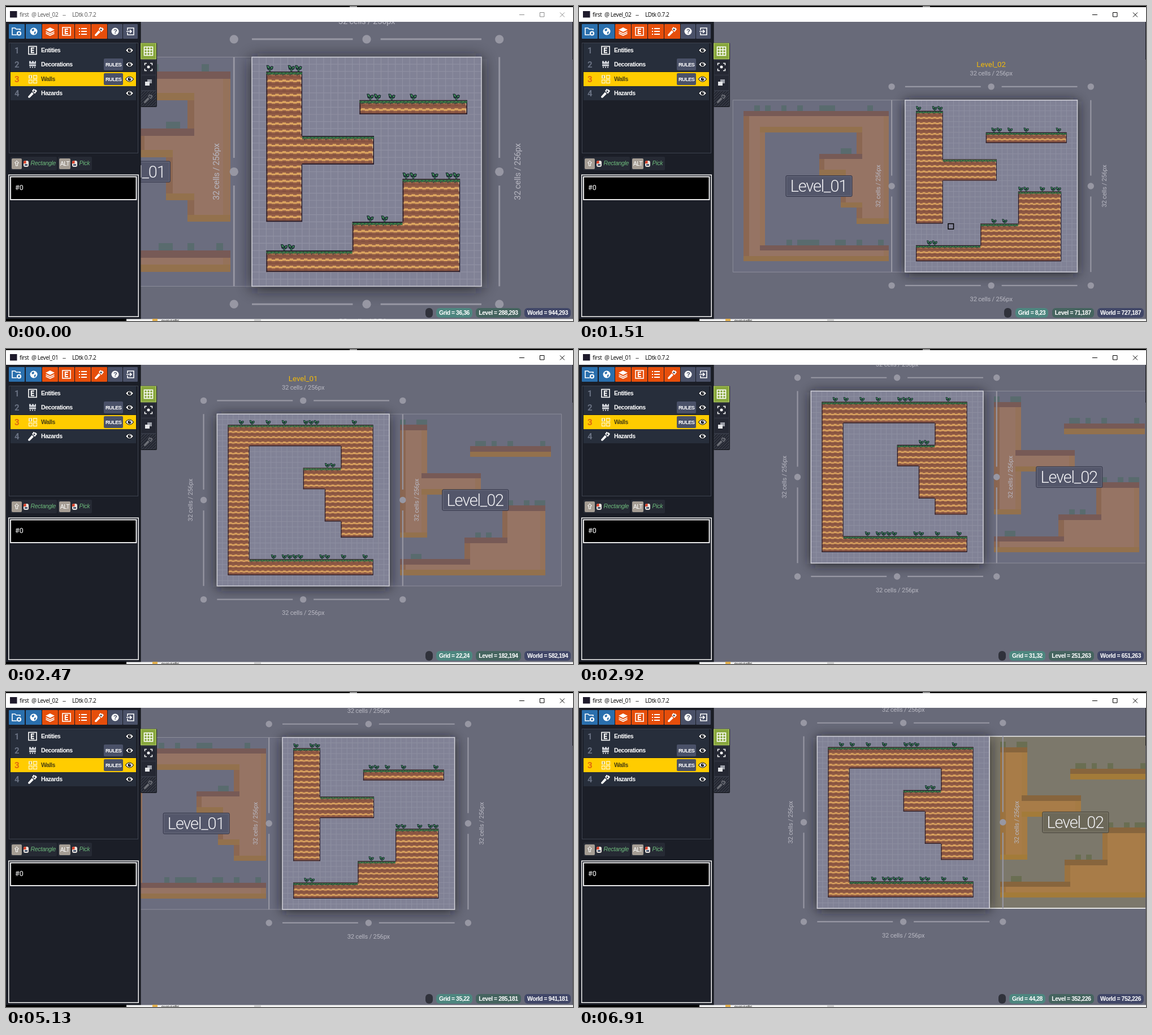
These frames come from a looping animation (1003 px wide and 558 px high, 8 s). An HTML page:

```html
<!DOCTYPE html>
<html lang="en">
<head>
<meta charset="utf-8">
<title>Level editor</title>
<style>
  html, body { margin: 0; width: 1003px; height: 558px; overflow: hidden; background: #686a79; }
  body { position: relative; }
  svg { position: absolute; left: 0; top: 0; display: block; }
  .ui { font: bold 10.6px "Liberation Sans", Arial, sans-serif; letter-spacing: -.5px; fill: #fff; }
  .title { font: 10px "Open Sans", sans-serif; letter-spacing: -.4px; }
  .num { font: bold 15px Roboto, sans-serif; fill: #697182; letter-spacing: 0; }
  .hint { font: italic 10.5px "Liberation Sans", Arial, sans-serif; letter-spacing: -.3px; fill: #6dba7c; }
  .size { font: 9.4px Roboto, sans-serif; letter-spacing: -.2px; fill: #b7b7c1; text-anchor: middle; }
  .name { font: 11.2px Roboto, sans-serif; fill: #f0b90c; text-anchor: middle; }
  .label { font: 300 29px Roboto, sans-serif; letter-spacing: -1.2px; fill: #f1f1f4; text-anchor: middle; }
  .tag { fill: #53566a; stroke: #34364a; }
  .bg { fill: #6b6d7f; stroke: #8c8d9a; stroke-width: 1; vector-effect: non-scaling-stroke; }
  .mid { fill: #967464; } .top { fill: #775a56; } .left { fill: #8b6752; }
  .right { fill: #95725a; } .bot { fill: #93714d; } .deco { fill: #596b6e; }
  .hot .bg { fill: #7c786b; stroke: #f2f2f2; stroke-width: 1.6; }
  .hot .mid { fill: #a87c48; } .hot .top { fill: #87653d; } .hot .left { fill: #9c7340; }
  .hot .right { fill: #a57b44; } .hot .bot { fill: #a37b39; } .hot .deco { fill: #6a6e52; }
  .hot .tag { fill: #6c6859; stroke: #47443a; }
  .dim path { shape-rendering: crispEdges; }
  #hud { position: absolute; right: 4px; top: 534.5px; height: 17px; display: flex; gap: 6.5px; align-items: stretch;
         font: bold 10.4px/17px "Liberation Sans", Arial, sans-serif; letter-spacing: -.45px; color: #fff; white-space: pre; }
  #hud span { padding: 0 5px; border-radius: 6px; min-width: 3px; }
</style>
</head>
<body>
<svg id="stage" width="1003" height="558" viewBox="0 0 1003 558"></svg>
<div id="hud">
  <span id="value"></span>
  <span id="grid" style="background:#4d867f"></span>
  <span id="local" style="background:#45645f"></span>
  <span id="world" style="background:#414768"></span>
</div>
<script>
const LOOP = 8000, S = 1.19, SIZE = 256;
const $ = id => document.getElementById(id);
const rect = (x, y, w, h, fill, more = '') =>
  `<rect x="${x}" y="${y}" width="${w}" height="${h}" fill="${fill}" ${more}/>`;
const path = (d, more) => `<path d="${d}" ${more}/>`;
const text = (x, y, s, cls, more = '') => `<text x="${x}" y="${y}" class="${cls}" ${more}>${s}</text>`;
const line = (d, w = 1.5, c = '#fff') => path(d, `fill="none" stroke="${c}" stroke-width="${w}"`);
const at = (x, y, s) => `<g transform="translate(${x} ${y})">${s}</g>`;

// Levels: wall blocks [x, y, w, h] in cells, plant columns by row
const levels = [
  { name: 'Level_01', x: 400,
    walls: [[2, 2, 27, 4], [2, 6, 4, 24], [23, 6, 6, 17], [16, 10, 7, 4], [20, 14, 3, 6], [6, 27, 23, 3]],
    plants: { 1: [4, 6, 9, 12, 16, 17, 18, 25], 9: [20, 21], 26: [10, 12, 13, 14, 15, 19, 20, 23, 27] } },
  { name: 'Level_02', x: 656,
    walls: [[2, 2, 5, 21], [7, 11, 10, 4], [15, 6, 15, 2], [2, 27, 12, 3], [14, 23, 7, 7], [21, 17, 8, 13]],
    plants: { 1: [2, 5, 6], 5: [16, 17, 19, 22, 28], 16: [21, 22, 25, 27, 28], 22: [16, 18], 26: [4, 5] } }
];

const isWall = (lv, x, y) => lv.walls.some(([a, b, w, h]) => x >= a && x < a + w && y >= b && y < b + h);

function build(lv) {
  const p = { mid: '', top: '', left: '', right: '', bot: '', deco: '' };
  let body = '', light = '', dark = '', edge = '', rim = '', grass = '', blades = '', plants = '';
  for (let y = 0; y < 32; y++) for (let x = 0; x < 32; x++) {
    const w = (i, j) => isWall(lv, x + i, y + j);
    if (!w(0, 0)) continue;
    const X = x * 8, Y = y * 8, sq = `M${X} ${Y}h8v8h-8z`;
    const up = w(0, -1), down = w(0, 1), l = w(-1, 0), r = w(1, 0);
    const corner = j => (l && !w(-1, j)) || (r && !w(1, j));
    p[!up || corner(-1) ? 'top' : !down || corner(1) ? 'bot' : !l ? 'left' : !r ? 'right' : 'mid'] += sq;
    body += sq;
    light += `M${X} ${Y + 2}h2v-1h4v1h2v2h-2v-.6h-4v.6h-2z`;
    dark += `M${X + 2} ${Y + 5}h4v1h2v1h-8v-1h2z`;
    if (!up) {
      edge += `M${X} ${Y + .5}h8`;
      grass += `M${X} ${Y + 1}h8v1.6h-1v1h-2v-1h-2v1h-1v-1h-2z`;
      blades += `M${X + 1} ${Y + 1.8}h1m3 0h1M${X} ${Y + 3.2}h2m1 0h2m2 0h1M${X + 2} ${Y + 4}h1`;
    }
    if (!down) edge += `M${X} ${Y + 7.4}h8`;
    if (!l) edge += `M${X + .6} ${Y}v8`;
    if (!r) { edge += `M${X + 7.7} ${Y}v8`; rim += `M${X + 6.9} ${Y + 1}v5`; }
  }
  for (const y in lv.plants) for (const x of lv.plants[y]) {
    p.deco += `M${x * 8} ${y * 8}h8v8h-8z`;
    plants += at(x * 8, y * 8,
      path('M3 8V6.5L1 5.5 0 1l2.5 0 1.7 2L6 2l2 .5-.6 3L5 6.5v1.5z', 'fill="#1d2f35"') +
      path('M.9 1.8l1.6.2 1.2 2.6-1.6-.4zM4.8 4.8l.9-1.8 1.4.2-.7 1.6zM3.6 5.6h.9v2h-.9z', 'fill="#43985c"'));
  }
  const dim = rect(0, 0, SIZE, SIZE, '', 'class="bg"') +
    Object.keys(p).map(k => path(p[k], `class="${k}"`)).join('');
  const lit = path(body, 'fill="#925c46"') + path(dark, 'fill="#84503f"') + path(light, 'fill="#dca45f"') +
    line(rim, .8, '#eed3a4') + line(edge, 1, '#211a2d') + path(grass, 'fill="#2f7544"') +
    line(blades, .9, '#1f3a38') + plants;
  return { dim, lit };
}

// Size handles and captions around the selected level, in level pixels
function frame() {
  const c = '#9797a3', m = SIZE / 2, g = 15.5, lo = -20, hi = SIZE + 20;
  let cells = '', bars = '', dots = '';
  for (let i = 1; i < 32; i++) cells += `M${i * 8} 0V${SIZE}M0 ${i * 8}H${SIZE}`;
  for (const k of [lo, hi])
    bars += `M0 ${k}H${m - g}M${m + g} ${k}H${SIZE}M${k} 0V${m - g}M${k} ${m + g}V${SIZE}`;
  for (const x of [lo, m, hi]) for (const y of [lo, m, hi])
    if (x !== m || y !== m) dots += `<circle cx="${x}" cy="${y}" r="4.8" fill="${c}"/>`;
  const cap = '32 cells / 256px';
  const side = x => text(0, 3.3, cap, 'size', `transform="translate(${x} ${m}) rotate(-90)"`);
  return {
    back: rect(0, 2, SIZE, SIZE, '#14141c', 'opacity=".85" filter="url(#blur)"') +
      rect(0, 0, SIZE, SIZE, '#818296') + line(cells, .75, '#8f90a2'),
    front: rect(0, 0, SIZE, SIZE, 'none', 'stroke="#d2d2da" stroke-width="1.5" vector-effect="non-scaling-stroke"') +
      line(bars, 1.8, c) + dots +
      text(m, -36.7, cap, 'size') + text(m, SIZE + 43.3, cap, 'size') + side(-40) + side(SIZE + 40) +
      text(m, -49, '', 'name', 'id="name"')
  };
}

const eye = y => at(218.5, y, path('M-7 0Q0-9 7 0Q0 9-7 0z', 'fill="#fff" stroke="#14171e" stroke-width="1.2"') +
  `<circle r="2.9" fill="#14171e"/><circle cx="1" cy="-1" r="1" fill="#fff"/>`);
const wand = path('M-8 6l7-8 3 3-7 7q-3 1-3-2zM-1-4l3-4 2 2 1-1 3 3-4 5z', 'fill="#fff"') +
  path('M1-3.6l2-1.6 2 2-1.6 1.8z', 'fill="#3a3f4c"');
const boxE = rect(-7, -7, 14, 14, 'none', 'stroke="#fff" stroke-width="1.6"') +
  line('M3-4H-2.2V4H3M-2 0H2.5', 2);
const gridIcon = rect(-7.5, -7.5, 15, 15, 'none', 'stroke="#fff" stroke-width="1.6"') +
  line('M-2.5-7V7M2.5-7V7M-7-2.5H7M-7 2.5H7', 1.5);
const mouse = (x, y) => at(x, y, rect(0, 0, 9, 11, '#e9e4df', 'rx="3"') +
  path('M0 5V3Q0 0 3 0H4.5V5z', 'fill="#d8432c"') + rect(2, 6, 5, 3, '#4d5870'));

function toolbar() {
  const icons = [
    line('M0 6H-8V-6H-3l2 2H6V-2', 1.6) + `<circle cx="4" cy="3.5" r="3" fill="none" stroke="#fff" stroke-width="2.2"/>`,
    `<circle r="6.5" fill="#fff"/>` + path('M-4-3l4-2 1 3-3 2zM1 1l3-1-1 4-2 1z', 'fill="#2a6fad"'),
    path('M0-7l8 4-8 4-8-4z', 'fill="#fff"') + line('M-7.5 .5l7.5 3.5 7.5-3.5M-7.5 3.5l7.5 3.5 7.5-3.5', 1.7),
    boxE,
    line('M-7-5h2M-3-5h10M-7 0h2M-3 0h10M-7 5h2M-3 5h10', 2.2),
    wand,
    `<circle r="6.5" fill="#fff"/>` + text(-3, 4, '?', 'ui', 'style="font-size:11px;fill:#4a5168"'),
    line('M-5-2V-6H6V6H-5V2M-7 0H2M-1-3l3 3-3 3', 1.6)
  ];
  const xs = [5, 35, 64, 93, 122, 151, 180, 207];
  return icons.map((s, i) => {
    const c = i < 2 ? '#2a6fad' : i < 6 ? '#e64e0b' : '#4a5168', w = i < 6 ? 28 : 26;
    return rect(xs[i], 32, w, 26, c, 'rx="1"') + at(xs[i] + w / 2, 45, s);
  }).join('');
}

function layers() {
  const icons = [
    boxE,
    path('M-6-6h3v2h2v-2h3v2h2v-2h2v5H-6zM-6 0h12v3H-6zM-5 4h2v2h-2zM-1 4h2v2h-2zM3 4h2v2H3z', 'fill="#d5d8de"'),
    rect(-7, -7, 6, 6, '#fff4c0') + line('M-4-6v4', 1.2, '#8a6a00') +
      line('M1.5-6.5h6v5.5h-6zM-6.5 1.5h5.5v5.5h-5.5zM1.5 1.5h6v5.5h-6z', 1.3, '#fff4c0'),
    wand
  ];
  return ['Entities', 'Decorations', 'Walls', 'Hazards'].map((name, i) => {
    const y = Math.round(66 + i * 25.4), c = y + 12.5, on = i === 2, rules = i === 1 || on;
    return rect(8, y, 222, 25, on ? '#ffcc00' : '#272e3b') +
      text(15, c + 5.4, i + 1, 'num', on ? 'style="fill:#e0670f"' : '') + at(47, c, icons[i]) +
      text(62, c + 3.6, name, 'ui', on ? 'style="fill:#4b4210"' : '') +
      (rules ? rect(173, c - 10.5, 34, 21, '#4a5168', 'rx="2"') +
        text(176, c + 3.6, 'RULES', 'ui', 'style="font-size:9.2px;letter-spacing:-.55px"') : '') + eye(c);
  }).join('');
}

function tools() {
  const corners = line('M-6.5-3V-6.5H-3M3-6.5H6.5V-3M6.5 3V6.5H3M-3 6.5H-6.5V3', 1.5) + `<circle r="2.5" fill="#fff"/>`;
  const tiles = rect(-2, -6, 8, 7, '#9a9da6') + rect(-6, -2, 8, 7, '#e4e5e8');
  let hatch = '';
  for (let k = 4; k < 54; k += 5) {
    const lo = Math.max(0, k - 27), hi = Math.min(27, k);
    hatch += `M${238.5 + lo} ${150.5 + hi}L${238.5 + hi} ${150.5 + lo}`;
  }
  return rect(238, 65, 29, 114, '#15171d', 'rx="2"') +
    rect(238.8, 66.2, 26.5, 27.5, '#87a63c', 'stroke="#a9c65c" stroke-width="1.5"') + at(252, 80, gridIcon) +
    [95.5, 123, 150.5].map(y => rect(239, y, 26.5, 26.5, '#252833', 'stroke="#353945"')).join('') +
    at(252, 108, corners) + at(252, 136, tiles) +
    at(252, 164, `<g opacity=".35">${wand}</g>`) + line(hatch, 1, '#434750');
}

function chrome() {
  return rect(0, 0, 1003, 2, '#000') + rect(608, 0, 13, 2, '#8b8b8b') + rect(0, 2, 1003, 26, '#fff') +
    rect(7, 9, 12.5, 11.5, '#1f1b2c') +
    `<g id="caption">` + text(24, 19, 'first', 'title') + text(45, 19, '', 'title', 'id="file"') +
    text(100, 19, '--', 'title') + text(117, 19, 'LDtk 0.7.2', 'title') + `</g>` +
    `<g id="buttons" fill="none">` + path('M908 15.5h9M944.5 11.5h7.5v7.5h-7.5zM980 11.5l8 8M988 11.5l-8 8', '') + `</g>` +
    rect(0, 28, 238, 527, '#1b1e27') + rect(237, 28, 1.5, 527, '#12141a') + toolbar() +
    rect(5.5, 65.5, 228, 195, '#1c1f28', 'stroke="#3d424e"') + layers() +
    rect(8, 267, 82, 24, '#262a34', 'rx="2"') + rect(92, 267, 60, 24, '#262a34', 'rx="2"') +
    rect(10, 270, 18, 19, '#a59d94', 'rx="2"') + line('M19 274l-3.5 4H17.5v5h3v-5H22.5z', 1) + mouse(31, 274) +
    text(43.5, 282, 'Rectangle', 'hint') +
    rect(94, 270, 20, 19, '#a59d94', 'rx="2"') +
    text(96, 283, 'ALT', 'ui', 'style="font-weight:400;font-size:10px"') + mouse(117, 274) +
    text(129.5, 282, 'Pick', 'hint') +
    rect(4.75, 299.25, 229.5, 251, '#1c1f28', 'stroke="#f4f4f4" stroke-width="1.5"') +
    rect(8, 302.5, 222.5, 40.5, '#000', 'stroke="#fff" stroke-width="1.8"') +
    text(16, 326, '#0', 'ui', 'style="font:12.5px Roboto,sans-serif;letter-spacing:0"') + tools() +
    rect(1002, 28, 1, 67, '#15161b') + rect(1002, 95, 1, 460, '#55565f') +
    rect(0, 554.5, 213, 4, '#000') + rect(213, 554.5, 790, 4, '#f4f4f4') +
    rect(259, 554, 9, 4, '#e3b04f') + rect(439, 555, 12, 3, '#d0d0d0') +
    text(274, 561.5, 'exports', 'title', 'fill="#222"');
}

const art = levels.map(build), box = frame();
$('stage').innerHTML =
  `<defs><filter id="blur" x="-20%" y="-20%" width="140%" height="140%"><feGaussianBlur stdDeviation="9"/></filter></defs>` +
  rect(0, 0, 1003, 558, '#686a79') +
  art.map((a, i) => `<g id="dim${i}" class="dim">${a.dim}</g>`).join('') +
  `<g id="back">${box.back}</g>` +
  art.map((a, i) => `<g id="lit${i}">${a.lit}</g>`).join('') +
  `<g id="front">${box.front}</g>` +
  levels.map((lv, i) => `<g id="tag${i}">` + rect(-58.5, -18.5, 117, 37, '', 'class="tag" rx="2"') +
    rect(-57, -17, 114, 34, 'none', 'stroke="#fff" opacity=".13"') + text(-.6, 10.5, lv.name, 'label') + `</g>`).join('') +
  `<rect id="cell" fill="none" stroke="#000"/>` + chrome();

// Screen updates arrive in bursts: [start, end, steps]
const bursts = [[100, 850, 8], [950, 1720, 8], [1840, 2060, 3], [2370, 3140, 8], [3260, 3380, 2],
  [3810, 4350, 6], [5130, 5570, 5], [5890, 6690, 8], [6790, 6910, 2]];
function snap(t) {
  let s = 0;
  for (const [a, b, n] of bursts) {
    if (t < a) break;
    const d = (b - a) / (n - 1);
    s = a + d * Math.min(n - 1, Math.floor((t - a) / d + .1));
  }
  return s;
}

const inOut = u => (1 - Math.cos(Math.PI * u)) / 2;
const out = u => Math.sin(u * Math.PI / 2);
const linear = u => u;
function track(keys, t, ease) {
  let i = 0;
  while (i < keys.length - 1 && keys[i + 1][0] <= t) i++;
  const a = keys[i], b = keys[i + 1];
  if (!b) return a.slice(1);
  const u = ease((t - a[0]) / (b[0] - a[0]));
  return a.slice(1).map((v, k) => v + (b[k + 1] - v) * u);
}

// Camera: screen place of the second level and zoom
const view = [[0, 435, 90.5, 1.586], [250, 435, 90.5, 1.586], [820, 472, 190, S], [1000, 472, 190, S],
  [1880, 645, 151.5, S], [2280, 645, 151.5, S], [2920, 715, 74.5, S], [3724, 715, 74.5, S],
  [4350, 489, 80.5, S], [5800, 489, 80.5, S], [6440, 726, 78.5, S]];
const pointer = [[0, 892.2, 555.6], [100, 892.2, 555.6], [350, 680, 500], [850, 556, 450], [950, 554.7, 448.8],
  [1060, 554.7, 448.8], [1720, 665, 372], [1950, 658.7, 369.9], [2060, 560, 350], [2370, 560, 350],
  [2700, 600, 400], [2920, 707.3, 390.4], [3140, 840, 300], [3380, 851.3, 285.7], [5020, 851.3, 285.7],
  [5130, 828.7, 296.5], [5570, 380, 300], [5890, 380, 300], [6690, 825, 340], [6910, 840.8, 348]];
const clicks = [2370, 3810, 5890], LAG = 110;

const camera = t => track(view, t, t < 2280 ? inOut : out);
const selected = t => 1 - clicks.filter(c => t >= c).length % 2;
const show = (id, on) => $(id).setAttribute('display', on ? 'inline' : 'none');

function draw(time) {
  const t = snap(time), sel = selected(t), [cx, cy, s] = camera(t), [mx, my] = track(pointer, t, linear);
  const left = i => cx + (levels[i].x - 656) * s;
  const place = i => `translate(${left(i)} ${cy}) scale(${s})`;

  levels.forEach((lv, i) => {
    const x = left(i), w = SIZE * s, off = i !== sel;
    const hot = off && mx >= x && mx < x + w && my >= cy && my < cy + w;
    for (const id of ['dim' + i, 'lit' + i]) $(id).setAttribute('transform', place(i));
    $('tag' + i).setAttribute('transform', `translate(${x + w / 2} ${cy + w / 2})`);
    show('dim' + i, off); show('tag' + i, off); show('lit' + i, !off);
    $('dim' + i).classList.toggle('hot', hot);
    $('tag' + i).classList.toggle('hot', hot);
  });
  for (const id of ['back', 'front']) $(id).setAttribute('transform', place(sel));
  $('name').textContent = levels[sel].name;
  $('file').textContent = '@ ' + levels[sel].name;
  const focus = t >= 1060;
  $('caption').setAttribute('fill', focus ? '#000' : '#555');
  $('buttons').setAttribute('stroke', focus ? '#000' : '#8a8a8a');

  // The readout trails the camera by one update
  const before = Math.max(0, t - LAG), [hx, hy, hs] = camera(before), lv = levels[selected(before)];
  const wx = Math.floor((mx - hx) / hs + 656), wy = Math.floor((my - hy) / hs), lx = wx - lv.x;
  const gx = Math.floor(lx / 8), gy = Math.floor(wy / 8);
  const busy = clicks.some(c => t >= c && t < c + 500);
  const inside = !busy && gx >= 0 && gx < 32 && gy >= 0 && gy < 32;
  const solid = inside && isWall(lv, gx, gy);
  $('value').textContent = solid ? '#0 (IntGrid)' : '';
  $('value').style.background = solid ? '#000' : '#30323b';
  $('grid').textContent = `Grid = ${gx},${gy}`;
  $('local').textContent = `Level = ${lx},${wy}`;
  $('world').textContent = `World = ${wx},${wy}`;

  const cell = $('cell'), set = (k, v) => cell.setAttribute(k, v);
  show('cell', inside);
  set('x', left(sel) + gx * 8 * s); set('y', cy + gy * 8 * s);
  set('width', 8 * s); set('height', 8 * s);
  set('stroke-width', solid ? 2.2 : 1.5);
}

const start = performance.now();
(function tick() {
  draw((performance.now() - start) % LOOP);
  requestAnimationFrame(tick);
})();
</script>
</body>
</html>
```
